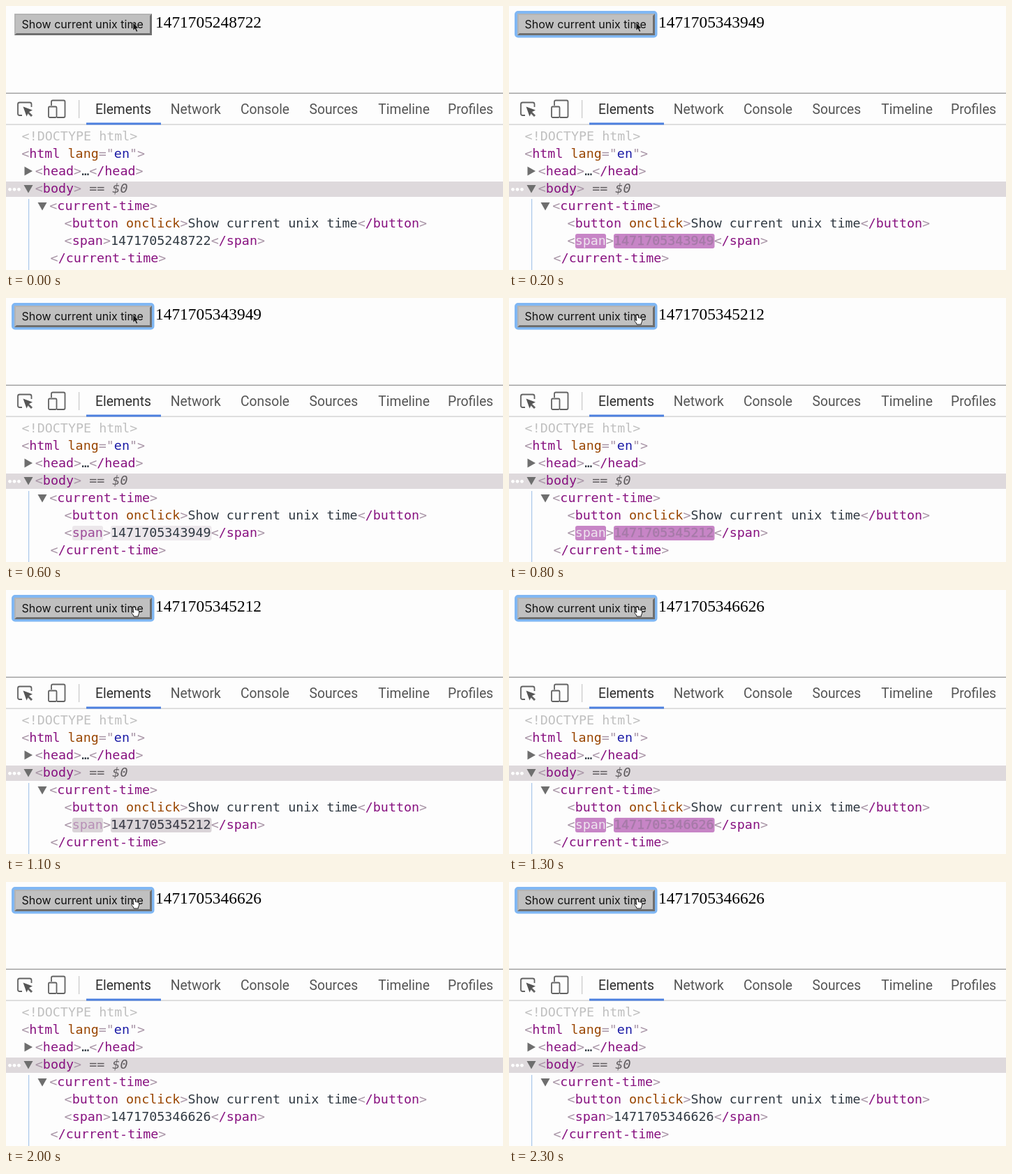
Write an HTML page that moves like this. It is 712 px wide and 379 px high and loops after 2400 ms.

```html
<!DOCTYPE html>
<html lang="en">
<head>
<meta charset="utf-8">
<title>Unix time button</title>
<style>
  html, body { margin: 0; width: 100%; height: 100%; overflow: hidden; background: #fdfdfd; }
  svg { display: block; width: 712px; height: 379px; }
  text { white-space: pre; }
  .button { font: 16px Inter, Roboto, sans-serif; fill: #111; }
  .number { font: 23.4px "Liberation Serif", "Noto Serif", serif; fill: #000; }
  .tab { font: 19.3px Roboto, "Open Sans", sans-serif; fill: #555; }
  .tab.on { fill: #2f2f2f; }
  .code { font: 18.38px "DejaVu Sans Mono", "Noto Sans Mono", monospace; fill: #303942; }
  .doc { fill: #c0c0c0; }
  .p { fill: #a894a6; }
  .tag { fill: #881280; }
  .attr { fill: #994500; }
  .val { fill: #1a1aa6; }
  .eq { fill: #5f5b5e; }
  .it { font-style: italic; }
</style>
</head>
<body>
<svg viewBox="0 0 712 379">
  <!-- page -->
  <rect width="712" height="379" fill="#fdfdfd"/>
  <rect id="ring" x="10" y="9" width="200.5" height="34.5" rx="3" fill="none" stroke="#80b7f3" stroke-width="4"/>
  <path d="M12 11H209V42H12Z" fill="#6f6f6f"/>
  <path d="M12 11H209L206 14V39H15L12 42Z" fill="#b4b4b4"/>
  <rect x="14" y="13" width="192" height="26" fill="#c0c0c0"/>
  <text class="button" x="22.5" y="32.4">Show current unix time</text>
  <text class="number" id="number" x="214" y="31.2"></text>
  <path id="arrow" d="M182 23.5V35.2L184.7 32.8L186.7 37.2L188.7 36.3L186.8 32H190Z" fill="#151515" stroke="#ddd" stroke-width=".6"/>
  <path id="hand" d="M183 24.3q1.7-.8 2 1l.6 3.2q1.3-.7 2 .4q1.2-.5 1.7.6q1.5-.2 1.5 1.5q.1 3-1.4 5.2v1.8h-6.2q-.7-2.3-2.8-4.4q-1.2-1.8.5-2.2q1 0 2 1.1l-.9-6.4q-.1-1.3 1-1.8z" fill="#fff" stroke="#1c1c1c"/>

  <!-- toolbar -->
  <rect y="124.5" width="712" height="1.5" fill="#a3a3a3"/>
  <rect y="169.5" width="712" height="1.2" fill="#cbcbcb"/>
  <rect x="115" y="167.5" width="107" height="3" fill="#4c80df"/>
  <rect x="104" y="135" width="1.2" height="26" fill="#c8c8c8"/>
  <g fill="none" stroke="#626262" stroke-width="1.8">
    <path d="M23 157H19.5Q17 157 17 154.5V141Q17 138.5 19.5 138.5H34Q36.5 138.5 36.5 141V145"/>
    <path d="M29 150L37 158" stroke-width="3"/>
    <path d="M65 143V137.5Q65 135.5 67 135.5H82.5Q84.5 135.5 84.5 137.5V158Q84.5 160 82.5 160H73"/>
    <rect x="61" y="144.5" width="11.5" height="15.5" rx="1.5"/>
  </g>
  <path d="M24.5 144.5L38 149.5L32.5 152.2L29.5 158.5Z" fill="#555"/>

  <!-- tree -->
  <rect y="252" width="712" height="22" fill="#ded9dc"/>
  <g fill="#fff"><circle cx="5.5" cy="263.3" r="2.4"/><circle cx="12" cy="263.3" r="2.4"/><circle cx="18.5" cy="263.3" r="2.4"/></g>
  <rect x="32" y="277" width="1.2" height="102" fill="#aac7ea"/>
  <g fill="#6e6e6e">
    <path d="M26.5 230.5L38 237L26.5 243.5Z"/>
    <path d="M25.5 257H38.5L32 268.5Z"/>
    <path d="M45.5 282H58.5L52 293.5Z"/>
  </g>
  <g id="glow">
    <rect x="95" y="327" width="44" height="21" rx="3"/>
    <rect x="150" y="327" width="144.5" height="21" rx="3"/>
  </g>
  <g id="tree"></g>
</svg>
<script>
const LOOP = 2400, STEP = 100;
const $ = id => document.getElementById(id);

function text(parent, cls, x, y, parts) {
  const make = (name, cls, str) => {
    const el = document.createElementNS("http://www.w3.org/2000/svg", name);
    el.setAttribute("class", cls);
    el.textContent = str;
    return el;
  };
  const line = make("text", cls, "");
  line.setAttribute("x", x);
  line.setAttribute("y", y);
  const spans = parts.map(([kind, str]) => line.appendChild(make("tspan", kind, str)));
  parent.append(line);
  return spans;
}

const tabs = [["Elements", 128], ["Network", 235.7], ["Console", 336], ["Sources", 434.5], ["Timeline", 533.3], ["Profiles", 633]];
tabs.forEach(([name, x], i) => text($("tree"), i ? "tab" : "tab on", x, 155, [["", name]]));

const open = name => [["p", "<"], ["tag", name], ["p", ">"]];
const close = name => open("/" + name);
const lines = [
  [22.6, [["doc", "<!DOCTYPE html>"]]],
  [22.2, [["p", "<"], ["tag", "html"], ["attr", " lang"], ["p", "=\""], ["val", "en"], ["p", "\">"]]],
  [41.8, [...open("head"), ["", "…"], ...close("head")]],
  [41.8, [...open("body"), ["eq", " == "], ["eq it", "$0"]]],
  [62.3, open("current-time")],
  [83.6, [["p", "<"], ["tag", "button"], ["attr", " onclick"], ["p", ">"], ["", "Show current unix time"], ...close("button")]],
  [83.6, [...open("span"), ["", ""], ...close("span")]],
  [63.6, close("current-time")]
];
const rows = lines.map(([x, parts], i) => text($("tree"), "code", x, 193 + 25 * i, parts));
const tagName = rows[6][1], digits = rows[6][3];

const clicks = [[0, "1471705248722"], [100, "1471705343949"], [700, "1471705345212"], [1200, "1471705346626"]];

// per step after a click: background, tag colour, digit colour, digit outline
const fade = [
  ["#ad58a9", "#ffffff", "#e6e2e6", 0],
  ["#c785c6", "#eee4ee", "#a67aa8", .5],
  ["#d5b3d4", "#d8bdd8", "#7c6885", .5],
  ["#d9d1d7", "#c5a0c5", "#62536d", .5],
  ["#dad4d8", "#b78fb6", "#3b3c48", .1],
  ["#ece7eb", "#9d4b98", "#303942", 0]
];
const rest = ["none", "#881280", "#303942", 0];

function draw(now) {
  const t = now % LOOP;
  const index = clicks.findLastIndex(([at]) => t >= at);
  const [at, value] = clicks[index];
  const [back, tag, ink, edge] = index && fade[Math.floor((t - at) / STEP)] || rest;

  $("number").textContent = digits.textContent = value;
  $("glow").style.fill = back;
  tagName.style.fill = tag;
  digits.style.fill = digits.style.stroke = ink;
  digits.style.strokeWidth = edge;

  $("ring").style.visibility = index ? "visible" : "hidden";
  $("arrow").style.visibility = t < 700 ? "visible" : "hidden";
  $("hand").style.visibility = t < 700 ? "hidden" : "visible";
}

const start = performance.now();
function tick() {
  draw(performance.now() - start);
  requestAnimationFrame(tick);
}
tick();
</script>
</body>
</html>
```
